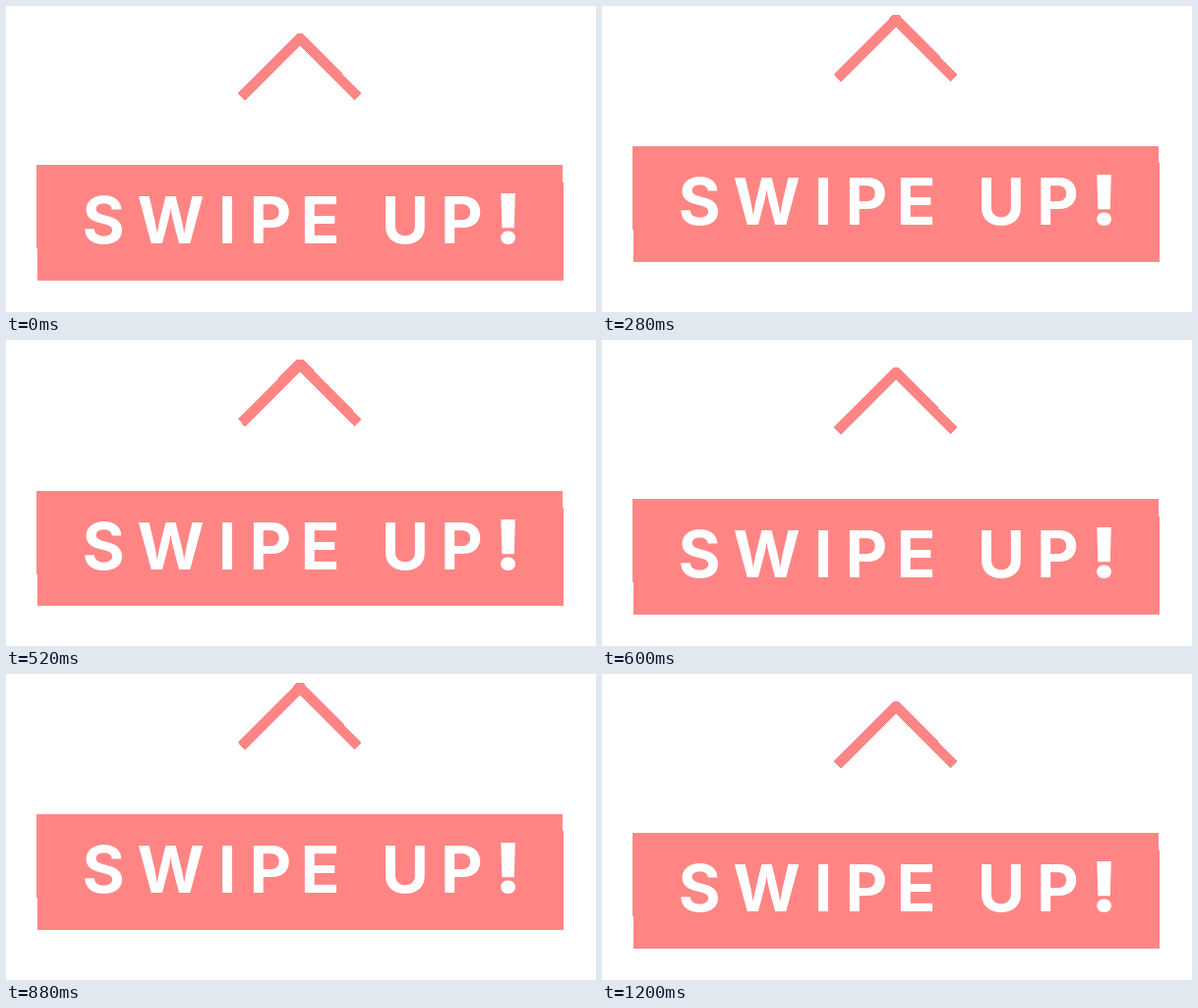
Write an HTML page that moves like this. It is 600 by 312 pixels and loops after 2.2 s.

```html
<!DOCTYPE html>
<html lang="en">
<head>
<meta charset="utf-8">
<title>Swipe up</title>
<style>
  html, body { margin: 0; width: 100%; height: 100%; overflow: hidden; background: #fff; }
  svg { display: block; width: 100%; height: 100%; }
  .shape { fill: #ff8585; shape-rendering: crispEdges; }
  text { font: 750 66px Inter, "Open Sans", sans-serif; fill: #fff; text-anchor: middle; white-space: pre; }
  .mark { font-size: 70px; font-weight: 900; }
</style>
</head>
<body>
<svg viewBox="0 0 600 312">
  <g id="sign">
    <path class="shape" d="M236 89L296 28H302L361.5 89L354.5 96.5L299 40.5L243 96.5Z"/>
    <path class="shape" d="M31 162H566V179.5H567V279.6H32V247H31Z"/>
    <text x="99 167.5 225 269 319.5 360 406 463.5" y="241.8">SWIPE UP<tspan class="mark" x="510.5">!</tspan></text>
  </g>
</svg>
<script>
  const LOOP = 2200, STEP = 40, BOUNCE = 600, RISE = 400, HEIGHT = 24;
  const sign = document.getElementById("sign");
  const ease = p => (1 - Math.cos(Math.PI * p)) / 2;

  // Two bounces (slow up, quick down), then a rest.
  function lift(t) {
    if (t >= 2 * BOUNCE) return 0;
    const b = t % BOUNCE;
    return HEIGHT * ease(b < RISE ? b / RISE : (BOUNCE - b) / (BOUNCE - RISE));
  }

  const start = performance.now();
  function draw() {
    const t = (performance.now() - start) % LOOP;
    const y = lift(Math.floor(t / STEP) * STEP);
    sign.setAttribute("transform", `translate(0 ${-y})`);
    requestAnimationFrame(draw);
  }
  draw();
</script>
</body>
</html>
```
